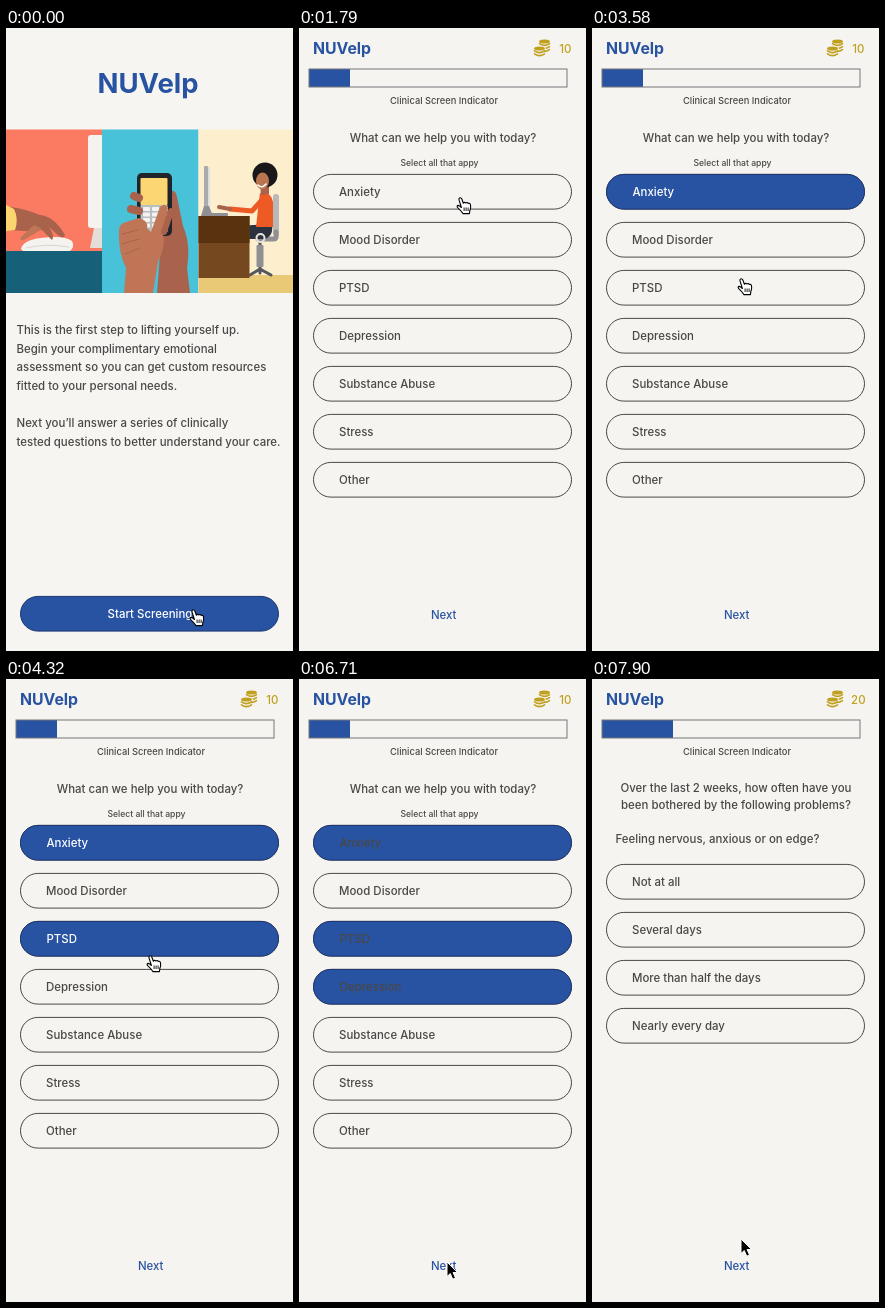
Write an HTML page that moves like this. It is 287x623 px and loops after 8 s.

```html
<!DOCTYPE html>
<html lang="en">
<head>
<meta charset="utf-8">
<title>Screening flow</title>
<style>
html, body { margin: 0; width: 100%; height: 100%; overflow: hidden; background: #f5f4f0; }
svg { display: block; width: 100%; height: 100%; }
text { font: 550 11.45px Inter, "Open Sans", sans-serif; fill: #4a4846; white-space: pre; }
.logo { font-weight: 700; fill: #2853a2; }
.mid { text-anchor: middle; }
.blue { fill: #2853a2; }
.white { fill: #fff; }
.gold { fill: #c0a01e; }
.box { fill: none; stroke: #4a4846; }
.on { fill: #2853a2; stroke: #1d3670; }
</style>
</head>
<body>
<svg id="stage" viewBox="0 0 287 623"></svg>
<script>
const LOOP = 8000, TICK = 148.7;
const DARK = '#a9624b', SKIN = '#c07656', GOLD = '#c0a01e';
const BRAND = 'NUVelp';

const text = (x, y, s, size = 11.45, cls = '') =>
  `<text x="${x}" y="${y}" style="font-size:${size}px" class="${cls}">${s}</text>`;
const mid = (x, y, s, size, cls = '') => text(x, y, s, size, 'mid ' + cls);
const rect = (x, y, w, h, fill, r = 0) =>
  `<rect x="${x}" y="${y}" width="${w}" height="${h}" rx="${r}" fill="${fill}"/>`;
const path = (d, fill) => `<path d="${d}" fill="${fill}"/>`;
const oval = (x, y, rx, ry, fill) =>
  `<ellipse cx="${x}" cy="${y}" rx="${rx}" ry="${ry}" fill="${fill}"/>`;
const line = (d, color, w) =>
  `<path d="${d}" fill="none" stroke="${color}" stroke-width="${w}" stroke-linecap="round" stroke-linejoin="round"/>`;
const pill = (y, cls = 'box') =>
  `<rect class="${cls}" x="14.5" y="${y + .4}" width="258" height="34.7" rx="17.35"/>`;
const option = (y, s) => pill(y) + text(40, y + 21.5, s);

function deskPanel() {
  return rect(0, 101.5, 96, 163.5, '#fb7b62')
    + rect(82, 107, 20, 93, '#f5f3ef', 3)
    + path('M88 200H96V220H84Z', '#e5ddd8')
    + rect(0, 223, 96, 42, '#17607a')
    + path('M15 221Q17 212 35 210Q58 207 66 213Q69 219 64 223H17Z', '#f5f3ef')
    + line('M20 220Q40 215 63 219', '#ddd4cf', 1)
    + path('M5 179Q20 181 34 187Q48 188 59 207Q58 211 53 208L43 199Q49 208 46 212L36 202Q28 204 17 203L5 202Z', DARK)
    + path('M28 197L36 201L18 212Q13 213 15 209Z', SKIN)
    + path('M0 177L8 181Q13 191 9 202L0 203Z', '#fbd56f');
}

function phonePanel() {
  let keys = '';
  for (let i = 0; i < 12; i++)
    keys += rect(137 + i % 3 * 9, 179 + (i / 3 | 0) * 5.5, 7, 4, '#f5f3ef', 1);
  return rect(96, 101.5, 96.5, 163.5, '#47c2d9')
    + path('M162 165Q169 159 171 169L177 198Q185 216 181 240L184 265H151L154 226Z', DARK)
    + rect(131, 145, 35, 63, '#20242b', 5)
    + rect(134.5, 150, 27, 27, '#fcd672', 1)
    + rect(134.5, 177, 27, 27, '#b9bec1') + keys
    + line('M128 168L133 170M125 181L133 183', DARK, 8)
    + path('M113 202Q113 196 120 194L133 190Q143 193 141 200L145 204L154 179Q159 174 162 180L157 207Q160 218 152 234L147 265H118L120 240Q112 225 113 202Z', SKIN)
    + line('M116 206L132 202M116 216L133 211M119 226L134 220', DARK, 1)
    + line('M165 183L158 204', DARK, 6);
}

function officePanel() {
  return rect(192.5, 101.5, 95, 163.5, '#fdefcd')
    + rect(192.5, 247, 95, 18, '#e9c876')
    + rect(267, 166, 6, 42, '#b9b7b7', 3)
    + line('M252 211H268Q271 211 270 204', '#8f8f94', 5)
    + line('M254 214V245M244 247L254 241L265 247', '#55575f', 3)
    + rect(250.5, 217, 7, 22, '#8f8f94', 1)
    + path('M266 196Q268 209 258 211H230L231 198Z', '#2c3140')
    + path('M254 165Q265 163 267 174V199H250L252 181Z', '#ee5a24')
    + line('M256 172L246 183L224 181', '#ee5a24', 5)
    + line('M224 181L213 179', DARK, 4)
    + path('M254 155H263V166L255 167Z', DARK)
    + oval(259, 147, 12.5, 12.5, '#191719')
    + oval(256.5, 153, 6.5, 8.5, '#b97450')
    + line('M252 157Q256 161 260 156', '#fff', 1.6)
    + rect(198, 138, 4, 46, '#a9abad', 1) + rect(202, 139, 2, 44, '#dedfdf')
    + path('M198 178H203L207 188H195Z', '#8f8f94')
    + rect(204, 185, 18, 3, '#8f8f94', 1)
    + rect(192.5, 188, 51, 62, '#754820') + rect(192.5, 188, 51, 27, '#59320f')
    + '<circle cx="254.5" cy="210" r="4" fill="none" stroke="#e8e3dc" stroke-width="2"/>';
}

const body = [
  [306, 'This is the first step to lifting yourself up.'],
  [324.6, 'Begin your complimentary emotional'],
  [343.2, 'assessment so you can get custom resources'],
  [361.8, 'fitted to your personal needs.'],
  [399, 'Next you’ll answer a series of clinically'],
  [417.6, 'tested questions to better understand your care.']
];

const intro = rect(0, 0, 287, 623, '#f7f5f2')
  + mid(142, 65, BRAND, 27.5, 'logo')
  + deskPanel() + phonePanel() + officePanel()
  + body.map(([y, s]) => text(10.5, y, s)).join('')
  + pill(568, 'on') + mid(144, 590, 'Start Screening', 11.45, 'white');

function coins(x, y, count) {
  let s = oval(x, y, 5.4, 2, GOLD);
  for (let i = 1; i < count; i++) {
    const edge = y + 3 * i - .8;
    s += line(`M${x - 5} ${edge}Q${x} ${edge + 3.6} ${x + 5} ${edge}`, GOLD, 1.6);
  }
  return s;
}

const header = text(14, 26, BRAND, 15.8, 'logo')
  + `<g id="reward">${coins(245.5, 13.4, 4)}`
  + oval(240.5, 20.6, 6.5, 3, '#f5f4f0') + coins(240.5, 20.6, 3)
  + '<text id="points" x="266.3" y="24.5" class="mid gold">10</text></g>'
  + '<rect id="bar" x="10" y="41" width="41" height="18" class="blue"/>'
  + '<rect x="10" y="41" width="258" height="18" fill="none" stroke="#77777a"/>'
  + mid(145, 76, 'Clinical Screen Indicator', 9.3);

const topics = ['Anxiety', 'Mood Disorder', 'PTSD', 'Depression', 'Substance Abuse', 'Stress', 'Other'];
// Topic index, tick of its click
const picks = [[0, 14], [2, 26], [3, 36]];

const first = mid(144, 114.2, 'What can we help you with today?')
  + mid(140.5, 138, 'Select all that appy', 8.6)
  + topics.map((s, i) => option(146 + 48 * i, s)).join('')
  + picks.map(([i]) => `<g id="pick${i}">${pill(146 + 48 * i, 'on')}`
    + `<text id="label${i}" x="40.5" y="${167.5 + 48 * i}">${topics[i]}</text></g>`).join('');

const second = mid(144, 113.4, 'Over the last 2 weeks, how often have you')
  + mid(144, 130.4, 'been bothered by the following problems?')
  + text(23.5, 164, 'Feeling nervous, anxious or on edge?')
  + ['Not at all', 'Several days', 'More than half the days', 'Nearly every day']
    .map((s, i) => option(185 + 48 * i, s)).join('');

const arrow = '<path id="arrow" d="M0 0V14.5L3.3 11.5L5.7 17.2L8.5 16L6.1 10.5H10.6Z" fill="#000" stroke="#fff"/>';
const hand = '<g id="hand" transform="translate(-5.6 -1)" stroke="#000" stroke-width="1.1" stroke-linejoin="round">'
  + '<path d="M5 10.5L2.7 3.2Q2.2 1 3.7 .7Q4.9 .6 5.4 2L7 6.2Q8.2 4.6 9.4 6Q10.8 4.8 11.8 6.4Q13.7 5.8 14.1 7.8Q14.6 10.5 13.5 13.2L13 16.6H6.6Q4 13 1 10.4Q.2 8.6 1.8 8.4Q3.2 8.6 5 10.5Z" fill="#fff"/>'
  + '<path d="M7.7 10.5V14M9.7 10.5V14M11.7 10.5V14" stroke-width=".9"/></g>';

document.getElementById('stage').innerHTML =
  rect(0, 0, 287, 623, '#f5f4f0') + header
  + `<g id="first">${first}</g><g id="second">${second}</g>`
  + mid(144.7, 591, 'Next', 11.45, 'blue')
  + `<g id="intro">${intro}</g><g id="cursor">${arrow}${hand}</g>`;

const el = id => document.getElementById(id);
const clamp = v => Math.max(0, Math.min(1, v));
const ease = v => v * v * (3 - 2 * v);
const span = (k, a, b) => ease(clamp((k - a) / (b - a)));
// Dissolve that settles in three ticks
const fade = (k, start) => {
  const n = k - start + 1;
  return n <= 0 ? 0 : n > 2 ? 1 : 1 - .39 ** n;
};

// Start tick, end tick, x, y
const moves = [
  [5, 6, 180, 532], [6, 7, 173, 345], [8, 12, 163, 170], [17, 21, 153, 244],
  [22, 24, 151, 251], [28, 30, 141, 303], [38, 40, 148, 583], [51, 53, 149, 560]
];
// Tick ranges with the pointing hand
const pointing = [[0, 0], [12, 13], [16, 25], [28, 35], [38, 38], [40, 44], [49, 51]];

function draw(t) {
  const k = Math.floor(t / TICK);

  el('intro').setAttribute('opacity', k > 1 ? 0 : 1 - fade(k, 1));

  for (const [i, start] of picks) {
    el('pick' + i).setAttribute('opacity', fade(k, start));
    el('label' + i).style.fill = k < 45 ? '#fff' : '#4a4846';
  }

  const p = span(k, 45, 49);
  el('first').setAttribute('opacity', 1 - p);
  el('second').setAttribute('opacity', p);
  el('bar').setAttribute('width', 41 + 30 * p);
  el('points').textContent = p < .5 ? 10 : 20;
  const pop = 1 + .35 * Math.sin(Math.PI * p);
  el('reward').setAttribute('transform', `translate(254 20) scale(${pop}) translate(-254 -20)`);

  let x = 189, y = 582;
  for (const [a, b, toX, toY] of moves) {
    const q = span(k, a, b);
    x += (toX - x) * q;
    y += (toY - y) * q;
  }
  el('cursor').setAttribute('transform', `translate(${x} ${y})`);
  const isHand = pointing.some(([a, b]) => k >= a && k <= b);
  el('hand').setAttribute('visibility', isHand ? 'visible' : 'hidden');
  el('arrow').setAttribute('visibility', isHand ? 'hidden' : 'visible');
}

const began = performance.now();
function loop() {
  draw((performance.now() - began) % LOOP);
  requestAnimationFrame(loop);
}
draw(0);
requestAnimationFrame(loop);
</script>
</body>
</html>
```
